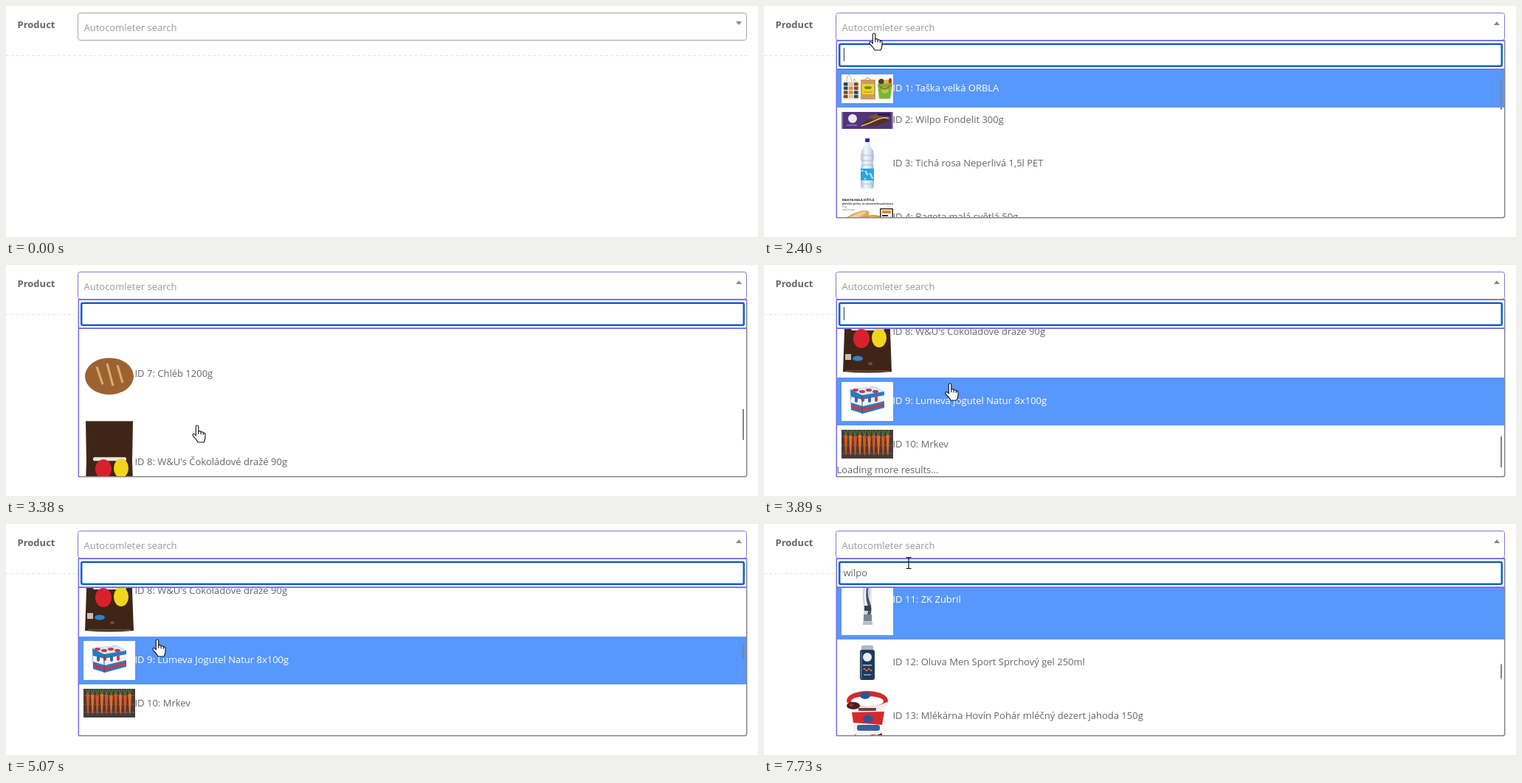
Recreate the animation shown at these times as an HTML page. Size 1019x314 px, loop 8000 ms.

```html
<!DOCTYPE html>
<html lang="cs">
<head>
<meta charset="utf-8">
<title>Product search</title>
<style>
  html, body { margin: 0; width: 100%; height: 100%; overflow: hidden; background: #fff; }
  svg { display: block; width: 100%; height: 100%; }
  text { font-family: "Open Sans", "Noto Sans", sans-serif; font-size: 13px; fill: #666; white-space: pre; }
</style>
</head>
<body>
<svg viewBox="0 0 1019 314">
  <defs>
    <clipPath id="view"><rect x="99" y="87" width="904" height="200"/></clipPath>
    <linearGradient id="glass">
      <stop offset="0" stop-color="#a9bfda"/><stop offset=".35" stop-color="#f2f7fc"/>
      <stop offset=".7" stop-color="#d5e2f0"/><stop offset="1" stop-color="#9db4d2"/>
    </linearGradient>
  </defs>

  <text x="15.5" y="30" font-weight="700">Product</text>
  <path d="M0 67.5H1005" stroke="#e4e4e4" stroke-dasharray="4 3"/>
  <rect id="select" x="97.5" y="9.5" width="906" height="37" rx="3" fill="#fff" stroke="#a3a3a3"/>
  <text x="105.5" y="34" style="fill:#999">Autocomleter search</text>
  <path id="arrow" fill="#888"/>

  <g id="drop">
    <rect id="panel" x="98" y="47" width="906" fill="#fff"/>
    <path id="edge" fill="none" stroke="#858585" stroke-width="1.5"/>
    <g clip-path="url(#view)">
      <g id="list"></g>
      <text id="more" x="98.5" y="283">Loading more results…</text>
      <rect id="thumb" x="998" width="2" fill="#858585"/>
    </g>
    <text id="wait" x="105" y="107">Searching…</text>
    <path id="side" fill="none" stroke="#7974e8" stroke-width="1.6"/>
    <path d="M98 47H1004M98 86H1004" stroke="#7974e8" stroke-width="1.8"/>
    <rect x="102.2" y="51.7" width="897.6" height="30" rx="2" fill="#fff" stroke="#1363c6" stroke-width="2.6"/>
    <text id="query" x="107.5" y="71"></text>
    <path id="caret" stroke="#333"/>
  </g>

  <g id="hand" fill="#fff" stroke="#111" stroke-width="1.1" stroke-linejoin="round">
    <path d="M-1.7 14V2Q-1.7 0 0 0Q1.8 0 1.8 2V8Q4.6 7 5.1 9Q7.8 8.200 8.300 10.200Q11 9.800 11 12V16Q11 19.500 9 23H1Q-.5 19.500-5.300 14.800Q-7 12.300-5 11.500Q-3.300 11.500-1.700 14Z"/>
    <path d="M1.800 8V12M5.100 9V12.500M8.300 10.200V13" fill="none"/>
  </g>
  <path id="beam" d="M-3.500-7.500H-1Q0-7.500 0-6.500Q0-7.500 1-7.500H3.500M0-6.500V6.500M-3.500 7.500H-1Q0 7.500 0 6.500Q0 7.500 1 7.500H3.500" fill="none" stroke="#111" stroke-width="1.2"/>
  <path id="pointer" d="M0 0V16.500L3.800 13L6.500 19L9 18L6.400 12H11.500Z" fill="#fff" stroke="#111"/>
</svg>

<script>
const LOOP = 8000;
const TOP = 87;
const ui = {};
document.querySelectorAll('svg [id]').forEach(el => ui[el.id] = el);

const rect = (x, y, w, h, fill, rx = 0) =>
  `<rect x="${x}" y="${y}" width="${w}" height="${h}" rx="${rx}" fill="${fill}"/>`;
const oval = (x, y, rx, ry, fill) => `<ellipse cx="${x}" cy="${y}" rx="${rx}" ry="${ry}" fill="${fill}"/>`;
const shape = (d, fill) => `<path d="${d}" fill="${fill}"/>`;
const line = (d, stroke, w = 1) => `<path d="${d}" fill="none" stroke="${stroke}" stroke-width="${w}"/>`;
const times = (n, f) => Array.from({ length: n }, (_, i) => f(i)).join('');

// Thumbnails are 70 wide and drawn from their own top left corner.
const art = {
  bags() {
    const tint = ['#28476d', '#d99339', '#7b4a2d', '#d8c7a7'];
    return line('M7 11Q7 1 10 1T14 11M16 11Q17 1 19 11', '#c9a77a') + rect(2, 9, 22, 25, '#f3e7d0') +
      times(12, i => rect(3 + i % 3 * 7, 11 + (i / 3 | 0) * 5.6, 5.6, 4.5, tint[i * 3 % 4 ^ (i / 3 & 1)], 1)) +
      line('M31 8Q35 1 40 8', '#a97943') + rect(26, 7, 20, 27, '#c89b62') +
      rect(28, 13, 16, 14, '#f5d221') + oval(36, 18, 5, 2, '#4a9b31') + rect(30, 23, 12, 2, '#e2a81d') +
      oval(54, 10, 4, 4, '#553726') + oval(62, 11, 5, 4, '#e4b13c') + oval(66, 9, 2, 4, '#a6301f') +
      shape('M49 13L69 12L66 33H51Z', '#77b735') + oval(59, 22, 5, 4, '#a4d04b') +
      line('M51 15Q58 25 67 14', '#c8483a', 1.5);
  },
  bar: () => rect(0, 0, 70, 23, '#513579') + rect(0, 0, 2, 23, '#8c76a8') + rect(68, 0, 2, 23, '#8c76a8') +
    oval(15, 9, 6, 6, '#eee7f6') + shape('M26 19Q34 8 44 11L60 5L65 12L48 19Z', '#55301f') +
    line('M27 19Q37 16 47 11T64 9', '#d8b995', 1.6) + shape('M36 6L48 3L55 6L43 10Z', '#85512f') +
    rect(49, 2, 17, 3, '#2f1c4a') + rect(7, 17, 14, 2, '#7f63a8'),
  water: () => rect(32, 1, 6, 5, '#252e92', 1) +
    shape('M32 6H38Q39 13 43 18L44 28L42.500 35L44 42V66Q43 70 39 69H31Q27 70 26 66V42L27.500 35L26 28L27 18Q31 13 32 6Z', 'url(#glass)') +
    rect(26, 42, 18, 16, '#2ba6d8') + times(9, i => oval(28 + i * 7 % 15, 45 + i * 5 % 12, 1.6, 1, '#bde8f5')) +
    line('M27 24H43M27 31H43M27 37H43M27 63H43', '#9eb4d1', .8),
  rolls: () => `<text x="1" y="4" style="font-size:4px;font-weight:700;fill:#222">BAGETA MALÁ SVĚTLÁ</text>
    <text x="1" y="8.500" style="font-size:3.200px;font-weight:700;fill:#333">pšeničné pečivo, ze zmrazeného polotovaru</text>
    <text x="1" y="12.500" style="font-size:3px">50 g</text><text x="1" y="16.500" style="font-size:3px">nový recept</text>` +
    `<g transform="rotate(-24 25 28)">${oval(20, 25, 20, 7, '#dca65f') + oval(22, 23, 14, 3, '#efcf98')}</g>` +
    `<g transform="rotate(-14 36 32)">${oval(36, 32, 19, 8, '#d69a50') + oval(35, 29, 12, 3, '#edc88b')}</g>` +
    rect(52, 14, 18, 18, '#3a2a20', 1) + rect(53.500, 15.500, 15, 15, '#fff') + rect(55, 17, 12, 4, '#d88b2d') +
    rect(55, 23, 8, 2, '#3a2a20') + rect(55, 27, 11, 2, '#3a2a20'),
  apple: () => oval(35, 56, 28, 28, '#c2352d') + oval(26, 46, 8, 11, '#dd6b55') + line('M35 30Q36 20 42 16', '#6b4526', 3),
  butter: () => shape('M4 40L48 28L66 42V70L22 84L4 68Z', '#f1d874') + shape('M4 40L48 28L66 42L22 54Z', '#f9eba9'),
  bread: () => oval(35, 55, 33, 25, '#9c6331') + line('M18 42L26 66M32 38L40 68M46 40L53 64', '#d9ae74', 3),
  candy: () => shape('M3 0H67L66 55L68 110Q35 113 2 110L4 55Z', '#3f2518') + rect(13, 49, 45, 5, '#ece5dc', 2) +
    oval(27, 65, 11, 13, '#d7222b') + oval(51, 64, 10, 13, '#f3d51e') +
    oval(22, 92, 7, 3.500, '#2d83cb') + oval(39, 99, 3, 2, '#7a4a2a') + rect(5, 86, 8, 8, '#c9bdb2') + rect(6, 108, 58, 2, '#65442f'),
  pack: () => shape('M12 10L44 6L58 13V35L29 43L13 38Z', '#2d79bd') + shape('M12 10L44 6L58 13L28 18Z', '#d9e8f3') +
    times(4, i => oval(19 + i * 9, 11 + i % 2 * 2, 4, 2, '#c5394a')) +
    shape('M13 20L28 24L58 18V26L29 33L13 28Z', '#f2f5f8') + shape('M13 31L29 36L58 29V32L29 40L13 35Z', '#c83849') +
    times(4, i => rect(18 + i * 9, 20 - i % 2, 4, 8, i % 2 ? '#d33b45' : '#3769a8', 2)) + line('M28 18V43', '#1c568f'),
  carrots: () => rect(0, 0, 70, 39, '#453b38') + line('M0 9H70M0 21H70M0 32H70', '#695b55') +
    times(10, i => {
      const x = 6 + i * 6.300, y = 8 + i % 3;
      return line(`M${x} ${y}L${x - 2} 1M${x} ${y}L${x + 2} 0`, '#4f8037', 1.2) +
        shape(`M${x - 2.400} ${y}Q${x} ${y - 3} ${x + 2.400} ${y}L${x + .8} 33L${x} ${36 - i % 2}L${x - 1} 30Z`, i % 2 ? '#e96a25' : '#d9531d');
    }),
  brush: () => rect(29, 14, 12, 50, '#e4e8ec', 3) + shape('M30 20H40L39 40Q36 48 40 58L42 81H29L31 58Q27 44 30 32Z', '#ccd4dd') +
    line('M37 20Q31 38 36 50T36 70', '#46536c', 4) + line('M33 30Q31 45 34 58', '#fff', 2) +
    rect(31, 56, 9, 7, '#343c50', 1) + rect(30, 68, 11, 9, '#7b8592', 1) + rect(29, 78, 13, 4, '#b5bec8'),
  gel: () => rect(27, 2, 16, 9, '#aab8c5', 2) + rect(25, 8, 20, 41, '#1d3a5c', 3) + rect(26, 11, 2, 36, '#45688b') +
    oval(35, 18, 6, 6, '#e7edf4') + rect(29, 28, 12, 2, '#8ba4bb') + times(4, i => oval(31 + i * 3, 34 + i % 2 * 2, 1.500, 1.300, '#d87c3e')) +
    rect(30, 41, 10, 2, '#7393ad'),
  cup: () => shape('M12 21H59L54 70H18Z', '#f6f3f2') + shape('M14 30L58 29L55 47L16 44Z', '#d32b2c') +
    oval(35, 14, 28, 13, '#d32b2c') + oval(35, 15, 22, 7, '#fff') + oval(32, 7, 7, 5, '#285698') +
    shape('M8 17Q35 28 62 16V22Q35 32 8 22Z', '#f0eeee') + oval(16, 21, 9, 5, '#4a2020') + oval(13, 20, 3, 2, '#9c2d2b') +
    rect(23, 24, 24, 4, '#6b4341', 1) + oval(36, 39, 7, 5, '#285698') + rect(21, 47, 31, 8, '#355f9e', 3) +
    shape('M18 60Q36 67 55 58L54 70H19Z', '#5a2524') + oval(43, 63, 6, 3, '#c72d32')
};

const rows = [
  ['Taška velká ORBLA', 51, 'bags'],
  ['Wilpo Fondelit 300g', 35, 'bar'],
  ['Tichá rosa Neperlivá 1,5l PET', 82, 'water'],
  ['Bageta malá světlá 50g', 64, 'rolls'],
  ['Jablka červená 1kg', 116, 'apple'],
  ['Máslo 250g', 116, 'butter'],
  ['Chléb 1200g', 116, 'bread'],
  ["W&U's Čokoládové dražé 90g", 124, 'candy'],
  ['Lumeva Jogutel Natur 8x100g', 65, 'pack'],
  ['Mrkev', 52, 'carrots'],
  ['ZK Zubril', 108, 'brush'],
  ['Oluva Men Sport Sprchový gel 250ml', 63, 'gel'],
  ['Mlékárna Hovín Pohár mléčný dezert jahoda 150g', 82, 'cup']
];
let offset = TOP;
ui.list.innerHTML = rows.map(([name, h, pic], i) => {
  const row = `<g transform="translate(99 ${offset})">${rect(0, 0, 904, h, '#5897fb')}
    <g transform="translate(6 6)">${rect(0, 0, 70, h - 12, '#fff') + art[pic]()}</g>
    <text x="75.500" y="${Math.floor(h / 2) + 4}">ID ${i + 1}: ${name.replace('&', '&amp;')}</text></g>`;
  offset += h;
  return row;
}).join('');
const items = [...ui.list.children].map(g => ({ g, bg: g.firstElementChild, label: g.lastElementChild }));

// Tracks hold [time, ...values], eased between neighbours.
const cursorTrack = [
  [60, 862, 269], [850, 152, 48], [910, 151, 43], [980, 149, 37], [2900, 149, 37], [3260, 259, 219],
  [3440, 259, 217], [3690, 259, 217], [3890, 252, 161], [4320, 206, 160], [5000, 206, 160],
  [5070, 205, 157], [5380, 205, 150], [5560, 196, 62], [5680, 196, 53], [5810, 196, 53],
  [5870, 190, 41], [5930, 196, 53]
];
const scrollTrack = [[3270, 0], [3440, 638], [5080, 638], [5340, 859]];
const hovers = [[0, 0], [2400, 1], [3090, 2], [3140, 3], [3690, 9], [5380, 11]];
const blinks = [1290, 1850, 2400, 2900, 3440, 4000, 4510, 5000, 5590, 6120, 6670, 7730];
const keys = [6740, 6800, 6990, 7090, 7180];
const word = 'wilpo';

function sample(track, t) {
  const next = track.findIndex(k => k[0] > t);
  if (next === 0) return track[0].slice(1);
  if (next < 0) return track[track.length - 1].slice(1);
  const a = track[next - 1], b = track[next];
  const p = (t - a[0]) / (b[0] - a[0]), e = p * p * (3 - 2 * p);
  return a.slice(1).map((v, i) => v + (b[i + 1] - v) * e);
}
const passed = (list, t) => list.filter(v => v <= t).length;
const show = (el, on) => el.setAttribute('display', on ? 'inline' : 'none');
const set = (el, attrs) => { for (const k in attrs) el.setAttribute(k, attrs[k]); };

function draw(t) {
  const open = t >= 1230, loaded = t >= 2400, extra = t >= 4510;
  const bottom = loaded ? 288 : 119;
  const [scroll] = sample(scrollTrack, t);

  set(ui.select, { stroke: open ? '#7e7ad8' : '#a3a3a3' });
  set(ui.arrow, { d: open ? 'M989 26L993 21L997 26Z' : 'M989 21L993 26L997 21Z' });
  show(ui.drop, open);
  set(ui.panel, { height: bottom - 47 });
  set(ui.side, { d: `M98.300 47V${bottom}` });
  set(ui.edge, { d: `M98 ${bottom - .2}H1001Q1003.700 ${bottom - .2} 1003.700 ${bottom - 3}V47` });
  show(ui.wait, !loaded);
  show(ui.list, loaded);
  show(ui.more, loaded && !extra && scroll > 0);
  set(ui.more, { y: 283 + 638 - scroll });
  set(ui.list, { transform: `translate(0 ${-scroll})` });

  const active = hovers[passed(hovers.map(h => h[0]), t) - 1][1];
  items.forEach(({ g, bg, label }, i) => {
    const on = i + 1 === active;
    show(g, i < 10 || extra);
    show(bg, on);
    label.style.fill = on ? '#fff' : '';
  });

  show(ui.thumb, loaded);
  set(ui.thumb, extra
    ? { y: 162 + (scroll - 638) / 221 * 26 + (t >= 6740 ? 2.500 : 0), height: 20 }
    : { y: 99 + scroll / 638 * 134, height: 42 });

  const typed = word.slice(0, passed(keys, t));
  if (ui.query.textContent !== typed) ui.query.textContent = typed;
  const x = 108.5 + (typed && open ? Math.round(ui.query.getComputedTextLength()) : 0);
  set(ui.caret, { d: `M${x} 57V75` });
  show(ui.caret, passed(blinks, t) % 2 === 1);

  const [cx, cy] = sample(cursorTrack, t);
  const kind = open && cy >= 50 && cy < TOP ? 'beam' : open || cy < 46 ? 'hand' : 'pointer';
  for (const name of ['hand', 'beam', 'pointer']) {
    show(ui[name], t >= 60 && name === kind);
    set(ui[name], { transform: `translate(${Math.round(cx)} ${Math.round(cy)})` });
  }
}

const start = performance.now();
function tick() {
  draw((performance.now() - start) % LOOP);
  requestAnimationFrame(tick);
}
tick();
</script>
</body>
</html>
```
